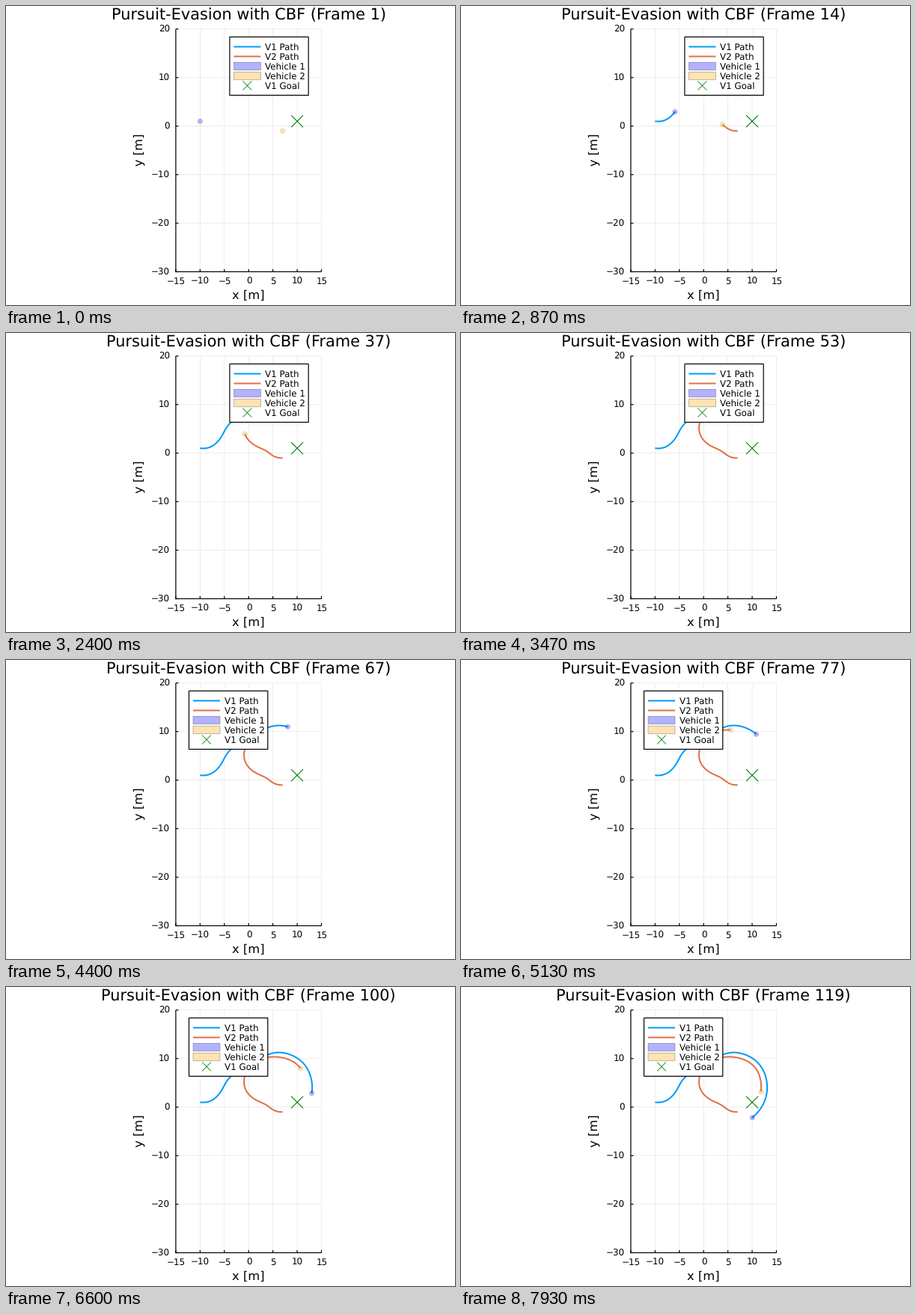
Recreate the animation shown at these times as a matplotlib script. Size 600 px wide and 400 px high, loop 8 s.

```python
import numpy as np
import matplotlib.pyplot as plt
from matplotlib.animation import FuncAnimation
from matplotlib.patches import Circle, Rectangle

W, H, DPI = 600, 400, 100
FRAMES, LOOP_MS = 120, 8000
PT = 72 / DPI                      # points per pixel
LEFT, RIGHT, TOP, BOTTOM = 226.9, 421.5, 30.8, 355.5
UNIT = (RIGHT - LEFT) / 30         # pixels per metre
MID = (LEFT + RIGHT) / 2
TITLE, GUIDE, SMALL = 20.83, 16.37, 11.9   # text sizes in pixels
V1_COLOR, V2_COLOR, GOAL_COLOR = "#009AFA", "#E26F46", "#008000"
RADIUS = 0.5
LEGEND_SWITCH = 7.5                # legend moves once vehicle 1 reaches this x

plt.rcParams.update({"font.family": "DejaVu Sans", "text.hinting": "none",
                     "path.snap": False})

# turning points of each drive: step, x [m], y [m]
V1_WAY = [(0, -10, 1), (7, -7.5, 1.45), (13, -5.9, 2.95), (22, -4.35, 5.55),
          (38, 0.1, 8.7), (59, 5.95, 11.25), (78, 11.3, 9), (99, 13, 2.85),
          (119, 9.75, -2.4)]
V2_WAY = [(0, 7, -1), (8, 4.95, -0.5), (13, 3.85, 0.3), (22, 1.65, 1.4),
          (36, -0.75, 3.95), (52, -0.1, 7.9), (70, 3.9, 10.25),
          (93, 9.7, 9), (119, 11.8, 2.85)]


def px(x):
    return LEFT + (x + 15) * UNIT


def py(y):
    return TOP + (20 - y) * (BOTTOM - TOP) / 50


def smooth_drive(way):
    """Cubic spline through the turning points, one position per step."""
    t, pos = np.array(way, float)[:, 0], np.array(way, float)[:, 1:]
    n, h = len(t), np.diff(t)
    slope = np.diff(pos, axis=0) / h[:, None]
    a, b = np.eye(n), np.zeros((n, 2))
    a[0, 1] = a[-1, -2] = -1       # steady curvature at both ends
    for i in range(1, n - 1):
        a[i, i - 1:i + 2] = h[i - 1], 2 * (h[i - 1] + h[i]), h[i]
        b[i] = 6 * (slope[i] - slope[i - 1])
    bend = np.linalg.solve(a, b)
    step = np.arange(FRAMES)
    k = np.clip(np.searchsorted(t, step, side="right") - 1, 0, n - 2)
    p, q, w = ((t[k + 1] - step)[:, None], (step - t[k])[:, None],
               h[k][:, None])
    curve = (bend[k] * (p**3 / w - p * w) + bend[k + 1] * (q**3 / w - q * w)) / 6
    return (curve + (pos[k] * p + pos[k + 1] * q) / w).T


fig = plt.figure(figsize=(W / DPI, H / DPI), dpi=DPI, facecolor="white")
ax = fig.add_axes([0, 0, 1, 1])
ax.set_xlim(0, W)
ax.set_ylim(H, 0)
ax.axis("off")


def stroke(xs, ys, color, width, z, alpha=1):
    line, = ax.plot(xs, ys, color=color, lw=width * PT, alpha=alpha, zorder=z,
                    solid_capstyle="butt", solid_joinstyle="round")
    return line


def label(x, y, s, size, z=3, **kw):
    return ax.text(x, y, s, fontsize=size * PT, color="black", zorder=z,
                   va="baseline", **kw)


def shape(kind, *args, z, **kw):
    return ax.add_patch(kind(*args, zorder=z, **kw))


def cross(x, y, r, width, z):
    return [stroke([x - r, x + r], [y - s * r, y + s * r],
                   GOAL_COLOR, width, z) for s in (1, -1)]


def minus(v):
    return str(v).replace("-", "\u2212")


def draw_axes():
    for v in range(-15, 16, 5):
        x = px(v)
        stroke([x, x], [TOP, BOTTOM], "black", 0.7, 1, 0.1)
        stroke([x, x], [BOTTOM, BOTTOM - 3.5], "black", 1.2, 2)
        label(x + 0.3, 371.6, minus(v), SMALL, ha="center")
    for v in range(-30, 21, 10):
        y = py(v)
        stroke([LEFT, RIGHT], [y, y], "black", 0.7, 1, 0.1)
        stroke([LEFT, LEFT + 3.5], [y, y], "black", 1.2, 2)
        label(219.2, y + 4.5, minus(v), SMALL, ha="right")
    stroke([LEFT, LEFT], [TOP, BOTTOM + 0.6], "black", 1.2, 2)
    stroke([LEFT - 0.6, RIGHT], [BOTTOM, BOTTOM], "black", 1.2, 2)
    label(MID, 392, "x [m]", GUIDE, ha="center")
    label(182.4, 192.3, "y [m]", GUIDE, ha="center", rotation=90,
          rotation_mode="anchor")


def draw_legend(x):
    rows = [54.5 + 13 * i for i in range(5)]
    names = ("V1 Path", "V2 Path", "Vehicle 1", "Vehicle 2", "V1 Goal")
    parts = [shape(Rectangle, (x, 41.4), 105.3, 78, z=10, fc="white",
                   ec="black", lw=1.2 * PT)]
    for y, color in zip(rows, (V1_COLOR, V2_COLOR)):
        parts.append(stroke([x + 5.5, x + 41.5], [y, y], color, 2, 11))
    for y, color in zip(rows[2:], ("blue", "orange")):
        box = (x + 5.5, y - 5.2), 36, 10.4
        parts.append(shape(Rectangle, *box, z=11, fc=color, alpha=0.3, lw=0))
        parts.append(shape(Rectangle, *box, z=11, fill=False, ec="black",
                           alpha=0.3, lw=0.8 * PT))
    parts += cross(x + 23.5, rows[4], 6, 0.8, 11)
    for y, name in zip(rows, names):
        parts.append(label(x + 47.2, y + 4.4, name, SMALL, 12))
    return parts


class Vehicle:
    def __init__(self, way, path_color, body_color, z):
        self.x, self.y = smooth_drive(way)
        self.path = stroke([], [], path_color, 2, z)
        disc = (0, 0), RADIUS * UNIT
        self.discs = [
            shape(Circle, *disc, z=z + 2, fc=body_color, ec="none", alpha=0.3),
            shape(Circle, *disc, z=z + 2, fill=False, ec="black",
                  lw=0.6 * PT, alpha=0.14),
        ]

    def move(self, n):
        xs, ys = px(self.x[:n + 1]), py(self.y[:n + 1])
        self.path.set_data(xs, ys)
        for disc in self.discs:
            disc.center = xs[-1], ys[-1]


draw_axes()
title = label(MID, 18, "", TITLE, ha="center")
v1 = Vehicle(V1_WAY, V1_COLOR, "blue", 4)
v2 = Vehicle(V2_WAY, V2_COLOR, "orange", 5)
cross(px(10), py(1), 8, 1.1, 8)
legend_right = draw_legend(298.9)
legend_left = draw_legend(244.5)


def update(n):
    title.set_text(f"Pursuit-Evasion with CBF (Frame {n + 1})")
    v1.move(n)
    v2.move(n)
    moved = v1.x[n] + RADIUS > LEGEND_SWITCH
    for part in legend_right:
        part.set_visible(not moved)
    for part in legend_left:
        part.set_visible(moved)
    return []


anim = FuncAnimation(fig, update, frames=FRAMES, interval=LOOP_MS / FRAMES,
                     repeat=True, repeat_delay=0, blit=False)
plt.show()
```
